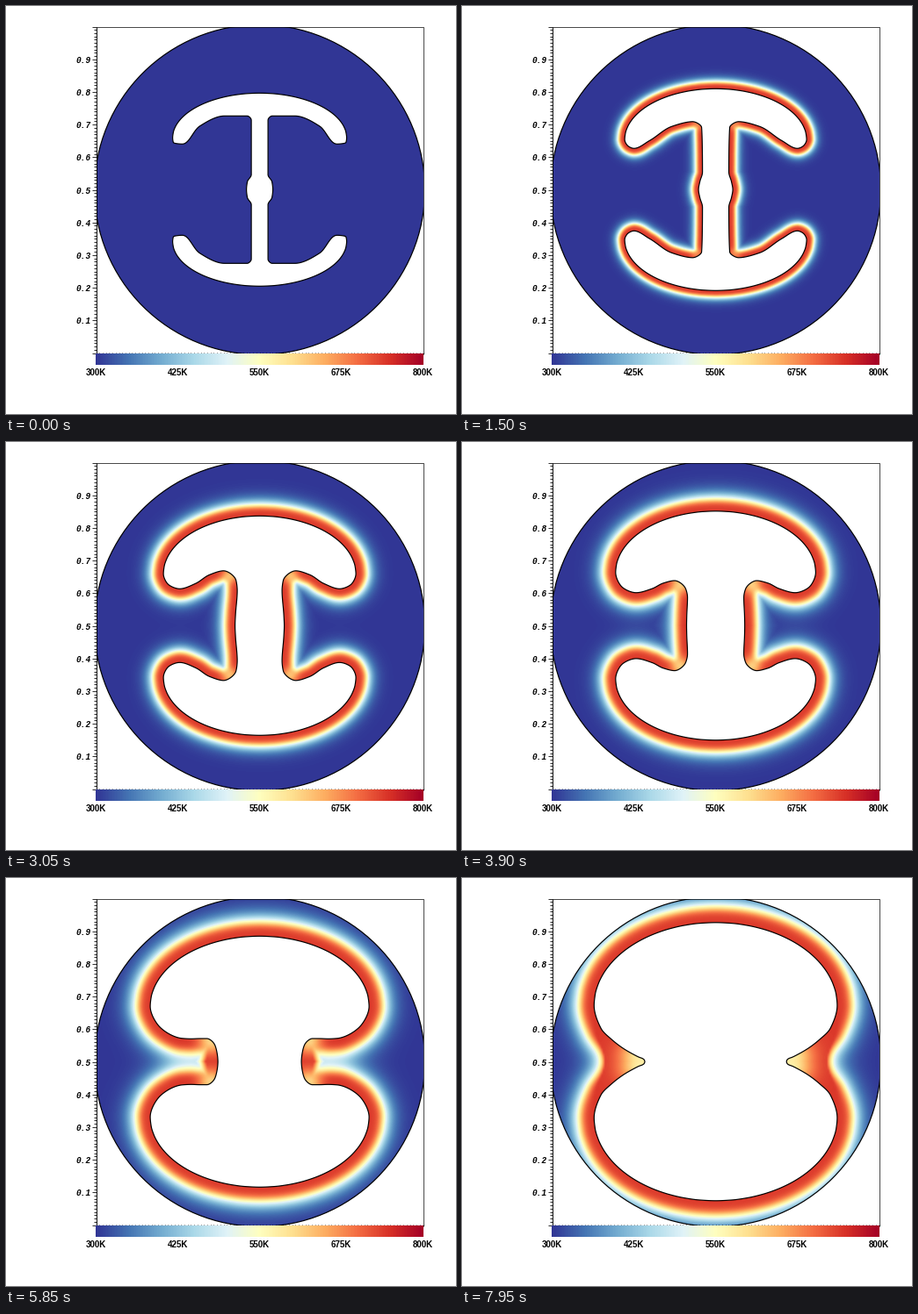
These frames come from a looping animation (512x465 px, 8000 ms). A matplotlib script:

```python
import numpy as np
import matplotlib.pyplot as plt
from matplotlib.animation import FuncAnimation
from matplotlib.patches import Circle, Polygon, Rectangle

W, H, DPI = 512, 465, 64
PX = 72 / DPI                       # points per pixel
STEP, FRAMES = 50, 160
CX, CY, R = 288.6, 209.3, 188
X0, X1, Y0, Y1 = 102.5, 474.5, 23.5, 395.5
SIDE = X1 - X0

# Cavity outline, one quadrant, in pixels from the centre. Each row: top of
# the arc, widest point, eight points round the arm and stem, stem half width.
SHAPE_T = np.array([0.3, 1.5, 3.05, 4.75, 5.85, 6.95, 7.95])
SHAPE = np.array([
    [110, 99, 59, 98, 53.5, 88, 52, 68, 72.5, 40, 84, 14, 84, 9.5, 79.5, 9.5, 17, 14, 9, 15],
    [115, 103.5, 57, 100, 50, 93, 47, 75, 56, 50, 72, 26, 77.5, 16, 71, 15, 20, 18, 9, 19.5],
    [125, 109.5, 59, 104, 47, 91, 42, 73, 48, 57, 58, 41, 62.5, 27, 52, 25.5, 40, 27.5, 12, 28],
    [136, 118.5, 62, 110, 42, 90, 32.5, 72, 35.5, 62, 38.5, 52, 39.5, 42, 33, 39, 20, 38.7, 8, 38.7],
    [143, 124.5, 63, 115, 41, 88, 26.5, 78, 26, 68, 26.3, 60, 26.3, 51.5, 20, 48.5, 10, 47.7, 4, 47.5],
    [151.5, 131.5, 64, 124, 41, 108, 25.5, 92, 18.5, 78, 15.5, 70, 12.5, 65.5, 8.5, 63.7, 5, 63.1, 2.5, 63],
    [158.5, 138.3, 64, 130.5, 38, 118, 25, 105, 15, 93, 8, 87, 5, 83, 3.5, 81.2, 2, 80.8, 1, 80.6],
])

# Heat layer: peak, plateau width, decay length, corner cooling and its
# radius, boost where two layers meet.
HEAT_T = np.array([0.05, 0.6, 1.5, 3.05, 4.75, 5.85, 6.95, 7.95])
HEAT = np.array([
    [0, 0, 1.5, 0, 6, 0],
    [0.8, 1.8, 2.8, 0.05, 6, 0],
    [1, 6, 3.6, 0.14, 7, 0],
    [1, 9.5, 6, 0.25, 9, 0],
    [1, 11.7, 7.5, 0.3, 12, 0],
    [1, 12.7, 8.5, 0.3, 14, 0],
    [1, 13.5, 9, 0.38, 24, 4],
    [1, 14, 9, 0.38, 24, 4],
])
PEAK = 0.885


def pchip(x, y, xq):
    """Shape-preserving cubic through the rows of y."""
    h = np.diff(x)[:, None]
    d = np.diff(y, axis=0) / h
    a, b = d[:-1], d[1:]
    same = a * b > 0
    wa, wb = 2 * h[1:] + h[:-1], h[1:] + 2 * h[:-1]
    a, b = np.where(same, a, 1), np.where(same, b, 1)
    inner = np.where(same, (wa + wb) / (wa / a + wb / b), 0)
    m = np.vstack([d[:1], inner, d[-1:]])
    xq = np.clip(xq, x[0], x[-1])
    i = np.clip(np.searchsorted(x, xq, side="right") - 1, 0, len(h) - 1)
    hi = h[i]
    s = ((xq - x[i])[:, None]) / hi
    return (y[i] * (1 + 2 * s) * (1 - s) ** 2 + m[i] * hi * s * (1 - s) ** 2
            + y[i + 1] * s ** 2 * (3 - 2 * s) + m[i + 1] * hi * s ** 2 * (s - 1))


def at_time(times, rows, t):
    return pchip(times, rows, np.array([t]))[0]


ARC = np.linspace(0, np.pi / 2, 13)


def outline(t):
    """Quadrant curve, the part of it on the arm, and the stem corner."""
    row = at_time(SHAPE_T, SHAPE, t)
    top, (wide, mid) = row[0], row[1:3]
    arc = np.column_stack([wide * np.sin(ARC), mid + (top - mid) * np.cos(ARC)])
    rest = np.append(row[3:], 0).reshape(-1, 2)
    knots = np.vstack([arc[1] * [-1, 1], arc, rest, rest[-2] * [1, -1]])
    s = np.append(0, np.cumsum(np.hypot(*np.diff(knots, axis=0).T)))
    n_arm = 1 + len(arc) + 6
    q = np.linspace(s[1], s[-2], 190)
    curve = pchip(s, knots, q)
    corner = (rest[4] + rest[5]) / 2
    return curve, curve[q <= s[n_arm - 1]], corner


GRID = np.arange(0, 189, 2.0)
GU, GV = np.meshgrid(GRID, GRID)
CELLS = np.column_stack([GU.ravel(), GV.ravel()])


def distance(cells, pts):
    sq = (pts ** 2).sum(1) - 2 * cells @ pts.T
    return np.sqrt(np.maximum(sq.min(1) + (cells ** 2).sum(1), 0))


def layer(d, width, decay):
    x = np.clip((d - width) / decay, -20, 20)
    return (1 + np.exp(3 * x)) ** (-1 / 3)


def heat_field(t, curve, arm, corner):
    peak, width, decay, cool, radius, boost = at_time(HEAT_T, HEAT, t)
    near = layer(distance(CELLS, curve), width, decay)
    far = layer(distance(CELLS * [1, -1], arm), width, decay)
    heat = np.minimum(near + far + boost * near * far, 1)
    r2 = ((CELLS - corner) ** 2).sum(1)
    heat *= PEAK * peak * (1 - cool * np.exp(-r2 / radius ** 2))
    quad = heat.reshape(GU.shape)
    half = np.hstack([quad[:, :0:-1], quad])
    return np.vstack([half[:0:-1], half])


def full_outline(c):
    pts = np.vstack([c, c[::-1] * [1, -1], c * [-1, -1], c[::-1] * [-1, 1]])
    return [CX, CY] - pts


fig = plt.figure(figsize=(W / DPI, H / DPI), dpi=DPI, facecolor="white")
ax = fig.add_axes([0, 0, 1, 1])
ax.axis("off")

box = Rectangle((X0, Y0), SIDE, SIDE, fc="none", ec="black", lw=0.7 * PX, zorder=5)
ax.add_patch(box)
disc = Circle((CX, CY), R, fc="none", ec="black", lw=1.2 * PX, zorder=4)
ax.add_patch(disc)
disc.set_clip_path(box)

span = GRID[-1] + 1
field = ax.imshow(np.zeros((2 * len(GRID) - 1,) * 2), cmap="RdYlBu_r", vmin=0, vmax=1,
                  extent=(CX - span, CX + span, CY + span, CY - span),
                  interpolation="bilinear", interpolation_stage="data", zorder=1)
field.set_clip_path(disc)
cavity = Polygon([(0, 0), (1, 1), (1, 0)], fc="white", ec="black", lw=1.2 * PX,
                 joinstyle="round", zorder=3)
ax.add_patch(cavity)

# white margin beyond the box, so that the field ends at its edge
for x, y, w, h in [(0, 0, X0, H), (X1, 0, W - X1, H), (0, 0, W, Y0), (0, Y1, W, H - Y1)]:
    ax.add_patch(Rectangle((x, y), w, h, fc="white", ec="none", zorder=2))

# rulers
line = dict(color="black", lw=0.8 * PX, zorder=6, solid_capstyle="butt")
ax.plot([X0, X0], [Y0, Y1], **line)
for k in range(101):
    p = k / 100 * SIDE
    size = 5 if k % 10 == 0 else 3
    ax.plot([X0 - size, X0], [Y1 - p] * 2, **line)
    ax.plot([X0 + p] * 2, [Y1 - 0.5, Y1 + 1.5], **line)
for k in range(1, 10):
    ax.text(96.5, Y1 - k / 10 * SIDE, f"0.{k}", ha="right", va="center_baseline",
            family="Liberation Mono", weight="bold", style="italic", size=9.5 * PX, zorder=6)

# colour scale
ax.imshow(np.linspace(0, 1, 372)[None], cmap="RdYlBu_r", aspect="auto",
          extent=(102, 475, 409.5, 397), interpolation="bilinear", zorder=6)
for k in range(5):
    ax.text(X0 + k / 4 * SIDE, 420.8, f"{300 + 125 * k}K", ha="center", va="baseline",
            family="Liberation Sans", weight="bold", size=9.8 * PX, zorder=6)

ax.set_xlim(0, W)
ax.set_ylim(H, 0)
ax.set_aspect("auto")


def draw(i):
    t = i * STEP / 1000
    curve, arm, corner = outline(t)
    field.set_data(heat_field(t, curve, arm, corner))
    cavity.set_xy(full_outline(curve))
    return field, cavity


anim = FuncAnimation(fig, draw, frames=FRAMES, interval=STEP, repeat=True,
                     repeat_delay=0, blit=False)
plt.show()
```
